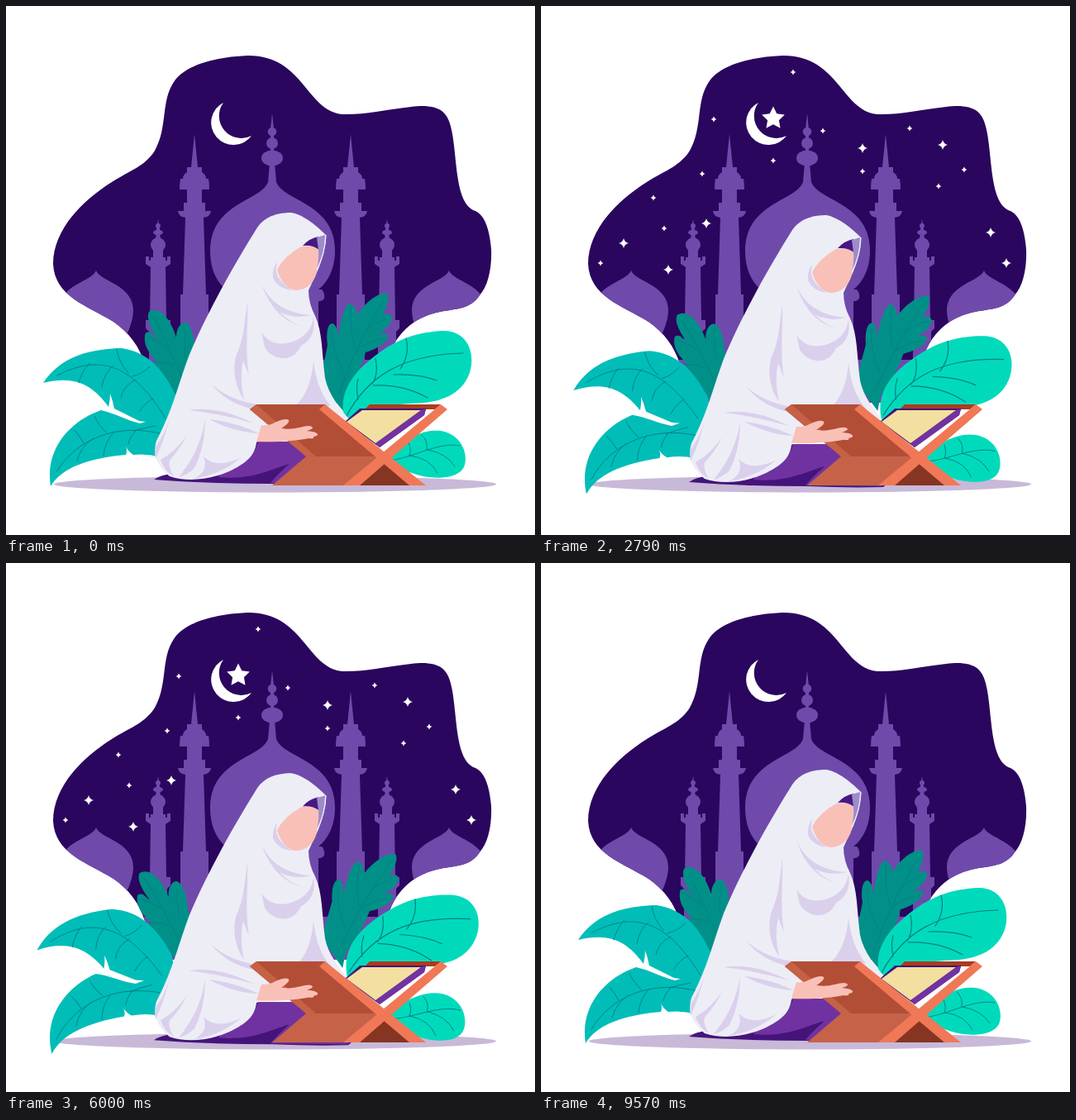
Animation of 640x640 px, one loop 9640 ms. Source, as an HTML page:

```html
<!DOCTYPE html>
<html lang="en">
<head>
<meta charset="utf-8">
<title>Evening reading</title>
<style>
html,body{margin:0;width:100%;height:100%;overflow:hidden;background:#fff}
svg{display:block;width:100%;height:100%}
.vein{fill:none;stroke:#067d88;stroke-width:.9;stroke-linecap:round}
.fold{fill:#dad0ec}
</style>
</head>
<body>
<svg viewBox="0 0 640 640">
<defs>
<path id="blob" d="M292 60C250 62 216 72 203 92C187 116 196 146 180 175C168 194 150 199 128 213C90 237 57 272 57 312C59 352 98 362 130 382C150 396 161 412 168 433L190 480H440L466 416C477 392 496 376 525 370C545 366 562 367 573 350C583 339 588 318 587 294C585 270 579 253 568 248C539 239 548 165 535 137C529 123 515 119 490 122C455 126 432 132 407 131C363 127 360 59 292 60Z"/>
<clipPath id="clip"><use href="#blob"/></clipPath>
<g id="tall">
<path d="M0 155L4 195H9V201Q14 204 14 209H17Q18 214 18 222H9V238H13V248H20Q19 255 11 256L14 349H17V440H-17V349H-14L-11 256Q-19 255-20 248H-13V238H-9V222H-18Q-18 214-17 209H-14Q-14 204-9 201V195H-4Z"/>
</g>
<g id="small">
<path d="M0 258L2 270L3 285H-3L-2 270ZM-6 296H6V304H9V308H11V303H15V312L9 316L10 380H15V390L11 394V440H-11V394L-15 390V380H-10L-9 316L-15 312V303H-11V308H-9V304H-6Z"/>
<circle cy="266" r="3"/><ellipse cy="274" rx="6" ry="3.2"/><circle cy="289" r="9"/>
</g>
<path id="dome" d="M0 320C4 333 45 337 45 368C45 385 35 400 31 412H-31C-35 400-45 385-45 368C-45 337-4 333 0 320Z"/>
</defs>

<ellipse cx="325.500" cy="578.500" rx="267.500" ry="10" fill="#c8b9d8"/>
<use href="#blob" fill="#2a065e"/>
<g clip-path="url(#clip)" fill="#6f4aab">
<path d="M322 130L324 149H320ZM320 150H324V176H320ZM319 190H325L327 213C335 236 398 238 398 296C398 322 386 337 378 343H382Q386 347 385 354Q382 358 378 357V440H266V357Q260 356 260 349L266 343C258 337 247 322 247 296C247 238 309 236 317 213Z"/>
<circle cx="322" cy="152" r="5.300"/><circle cx="322" cy="166" r="7"/><ellipse cx="322" cy="184" rx="13" ry="9.500"/>
<use href="#tall" x="228"/><use href="#tall" x="417"/>
<use href="#small" x="184"/><use href="#small" x="461"/>
<use href="#dome" x="109"/><use href="#dome" x="536"/>
<path d="M160 428H470V490H160Z"/>
</g>
<path d="M263 117A27 27 0 1 0 297 157A27 27 0 0 1 263 117Z" fill="#fff"/>
<g id="stars" fill="#fff"></g>

<g id="darkL">
<path fill="#009088" d="M178 368C189 367 200 381 206 401C206 389 212 382 218 383C225 387 228 402 228 417L240 500L205 473C197 455 189 442 173 431Q179 430 184 432C177 424 166 413 168 399Q168 393 175 395L186 406C176 394 168 375 174 369Z"/>
<path class="vein" d="M178 376Q198 410 220 470M172 400Q186 407 196 414M180 430Q193 430 203 436M218 391Q215 405 217 425"/>
</g>
<g id="darkR">
<path fill="#009088" d="M408 490L383 460C380 444 386 428 389 410C387 396 389 384 395 384Q401 386 402 402C405 378 410 362 416 360Q423 362 425 374C434 359 452 345 461 348C465 353 461 365 455 374Q465 370 467 377C466 386 457 393 450 397Q459 394 463 399C459 409 446 416 435 419C429 440 423 449 410 472Z"/>
<path class="vein" d="M459 354Q430 395 403 468M418 364Q415 390 422 413M395 391Q393 414 408 443M462 378Q445 382 434 395M459 402Q438 405 424 417"/>
</g>
<g id="tealU">
<path fill="#00bdb8" d="M45 456C63 429 92 415 140 414C174 419 193 443 207 475L215 550L190 553Q195 512 181 505L161 502L131 487Q129 477 126 469Q126 477 124 485C104 457 82 447 45 456Z"/>
<path class="vein" d="M62 447C116 419 155 436 193 499M134 415Q136 431 148 444M101 432Q91 443 88 456M130 435Q119 443 116 461M157 452Q142 459 139 474M153 448Q166 445 174 436M178 475Q169 479 161 491"/>
</g>
<g id="tealL">
<path fill="#00bdb8" d="M54 581C47 538 75 503 115 489C133 493 145 501 162 505L187 498L215 570L188 546Q171 541 154 543Q148 539 145 533Q147 538 145 543C100 547 68 558 54 581Z"/>
<path class="vein" d="M61 564C84 525 133 503 190 518M107 496Q111 506 121 516M83 513Q89 520 94 529M106 523Q91 532 86 550M131 515Q119 528 118 544M155 514Q168 510 181 508M157 514Q149 522 148 530"/>
</g>
<g id="mintU">
<path fill="#00dabb" d="M412 508C397 468 422 440 455 417C482 398 512 393 532 393C558 395 567 418 562 440C554 470 526 478 506 480C468 482 437 484 412 508Z"/>
<path class="vein" style="stroke-width:1.200" d="M412 496C437 449 477 422 553 420M484 402Q489 422 477 439M447 426Q451 446 443 457M469 446Q500 445 521 453M444 459Q480 457 510 474M426 476Q423 462 426 451"/>
</g>
<g id="mintL">
<path fill="#00dabb" d="M440 545C471 541 492 510 526 514C550 518 559 540 555 555C550 573 519 572 505 569C488 566 472 554 455 560Z"/>
<path class="vein" d="M455 550C485 552 520 526 549 532M503 519Q511 526 509 537M487 528Q491 538 488 544M510 537Q533 541 543 557M489 544Q513 547 522 565"/>
</g>

<g id="body">
<path fill="#45147a" d="M179 573Q187 567 202 566L305 527H365L425 570L414 579Q370 580 322 578Q245 578 179 573Z"/>
<path fill="#7132a1" d="M305 527H362L425 570L412 578L320 577Q329 566 343 554C321 560 298 574 257 570Q260 562 287 551Q301 542 305 527Z"/>
<path fill="#ededf6" d="M345 250C326 250 312 256 304 268C281 305 244 368 221 424C208 459 202 488 182 526C175 550 191 562 198 569C216 575 242 575 270 563C291 553 301 544 303 528L311 506L340 520L425 510C405 490 390 470 386 450C382 419 383 394 374 375Q366 360 366 344L378 318Q387 295 387 277Q363 253 345 250Z"/>
<g class="fold">
<path d="M329 309Q320 327 346 344Q329 342 323 329Q322 316 329 309Z"/>
<path d="M309 336C319 358 338 372 370 374Q348 379 331 370Q346 386 365 389Q325 383 309 336Z"/>
<path d="M309 395C322 415 348 410 362 397Q370 390 372 376Q376 401 357 411C346 434 322 428 313 413Z"/>
<path d="M292 357C288 388 288 402 278 424C274 440 277 461 288 476Q282 449 287 429L294 447C289 412 293 394 292 357Z"/>
<path d="M372 429Q369 466 350 484H393Q376 465 372 429Z"/>
<path d="M248 457Q270 477 304 482L300 488Q267 481 248 457Z"/>
<path d="M221 489Q256 483 300 505Q259 493 221 489Z"/>
<path d="M246 500Q276 503 306 517Q277 516 246 500Z"/>
<path d="M241 500C235 534 223 552 209 570Q220 567 228 559Q241 533 241 500Z"/>
<path d="M219 519Q211 535 201 546Q193 552 203 569Q191 562 187 549Q205 539 219 519Z"/>
<path d="M198 499Q191 520 182 532Q179 538 181 548Q191 526 198 499Z"/>
<path d="M239 545Q255 561 285 546Q260 567 227 572Q246 563 239 545Z"/>
</g>
<path fill="#f9c0b8" d="M357 291Q369 289 379 294Q379 316 374 328Q367 343 351 344Q335 342 328 319Q336 303 357 291Z"/>
<path fill="#471882" d="M359 290Q367 281 378 279L379 295Q371 289 359 290Z"/>
<path fill="#9e8bca" d="M376 280L386 277Q386 300 376 319Q379 305 378 295Z"/>
<path fill="none" stroke="#ededf6" stroke-width="1.300" d="M387 277Q386 300 376 319"/>
</g>

<g id="stand">
<path fill="#a93c20" d="M440 482H526L519 488H434Z"/>
<path fill="#451579" d="M428 487H508L506 495L452 534L410 503Z"/>
<path fill="#7332a1" d="M504 488H508L506 495L452 534L447 529Z"/>
<path fill="#f3dfa0" d="M431 489H502L447 529L412 503Z"/>
<path fill="#b34e36" d="M295 488L303 482H386L458 545H363Z"/>
<path fill="#c56145" d="M295 488L303 482L375 545H363Z"/>
<path fill="#c66247" d="M363 545H454L410 580H322Z"/>
<path fill="#863522" d="M457 549L490 580H424Z"/>
<path fill="#f07856" d="M526 482L534 488L428 580H408Z"/>
<path fill="#f07856" d="M386 482L508 580H488L379 488Z"/>
</g>
<path id="hand" fill="#f9c0b8" d="M303 527L309 507Q318 508 325 504Q338 498 342 501Q344 504 333 511Q344 513 355 510Q369 506 371 510Q371 512 364 514Q376 515 377 518Q378 520 372 521Q374 524 366 523C350 526 330 528 303 527Z"/>
</svg>
<script>
const LOOP = 9640;
const $ = id => document.getElementById(id);
const clamp = v => Math.max(0, Math.min(1, v));

// id, pivot x, pivot y, swing in degrees
const leaves = [
  ["darkL", 238, 513, -5.6], ["darkR", 408, 480, 5.3],
  ["tealU", 190, 553, -5.6], ["tealL", 208, 570, -5.6],
  ["mintU", 431, 533, 5.6], ["mintL", 440, 545, 5.6]
].map(([id, x, y, turn]) => ({ el: $(id), x, y, turn }));

const big = [[389,172],[486,168],[200,263],[100,287],[154,319],[544,274],[563,311]];
const little = [[305,80],[209,137],[341,151],[446,148],[512,198],[481,218],
  [389,200],[281,187],[195,203],[136,232],[149,269],[72,311]];

function addStar(x, y, d) {
  const el = document.createElementNS("http://www.w3.org/2000/svg", "path");
  el.setAttribute("d", d);
  $("stars").append(el);
  return { el, x, y };
}

function sparkle(r) {
  const k = r * .2;
  return `M0 ${-r}Q${k} ${-k} ${r} 0Q${k} ${k} 0 ${r}Q${-k} ${k} ${-r} 0Q${-k} ${-k} 0 ${-r}Z`;
}

function fivePoint(r) {
  const pts = Array.from({ length: 10 }, (_, i) => {
    const a = i * Math.PI / 5, d = i % 2 ? r * .5 : r;
    return `${(Math.sin(a) * d).toFixed(2)} ${(-Math.cos(a) * d).toFixed(2)}`;
  });
  return "M" + pts.join("L") + "Z";
}

const stars = [
  ...big.map(([x, y]) => addStar(x, y, sparkle(6))),
  ...little.map(([x, y]) => addStar(x, y, sparkle(3.4)))
];
const mainStar = addStar(281, 136, fivePoint(14.5));

function place({ el, x, y }, s) {
  el.setAttribute("transform", `translate(${x} ${y}) scale(${s})`);
}

function draw(t) {
  const p = (1 - Math.cos(2 * Math.PI * t / LOOP)) / 2;
  for (const l of leaves)
    l.el.setAttribute("transform", `rotate(${l.turn * p} ${l.x} ${l.y})`);
  $("body").setAttribute("transform", `translate(0 ${5 * p})`);
  $("hand").setAttribute("transform", `translate(0 ${3 * p})`);

  const size = Math.min(clamp(t / 1800), clamp((9560 - t) / 3460));
  stars.forEach(s => place(s, size));
  place(mainStar, Math.min(clamp(t / 1200), clamp((9540 - t) / 1200)));
}

const start = performance.now();
function tick() {
  draw((performance.now() - start) % LOOP);
  requestAnimationFrame(tick);
}
tick();
</script>
</body>
</html>
```
